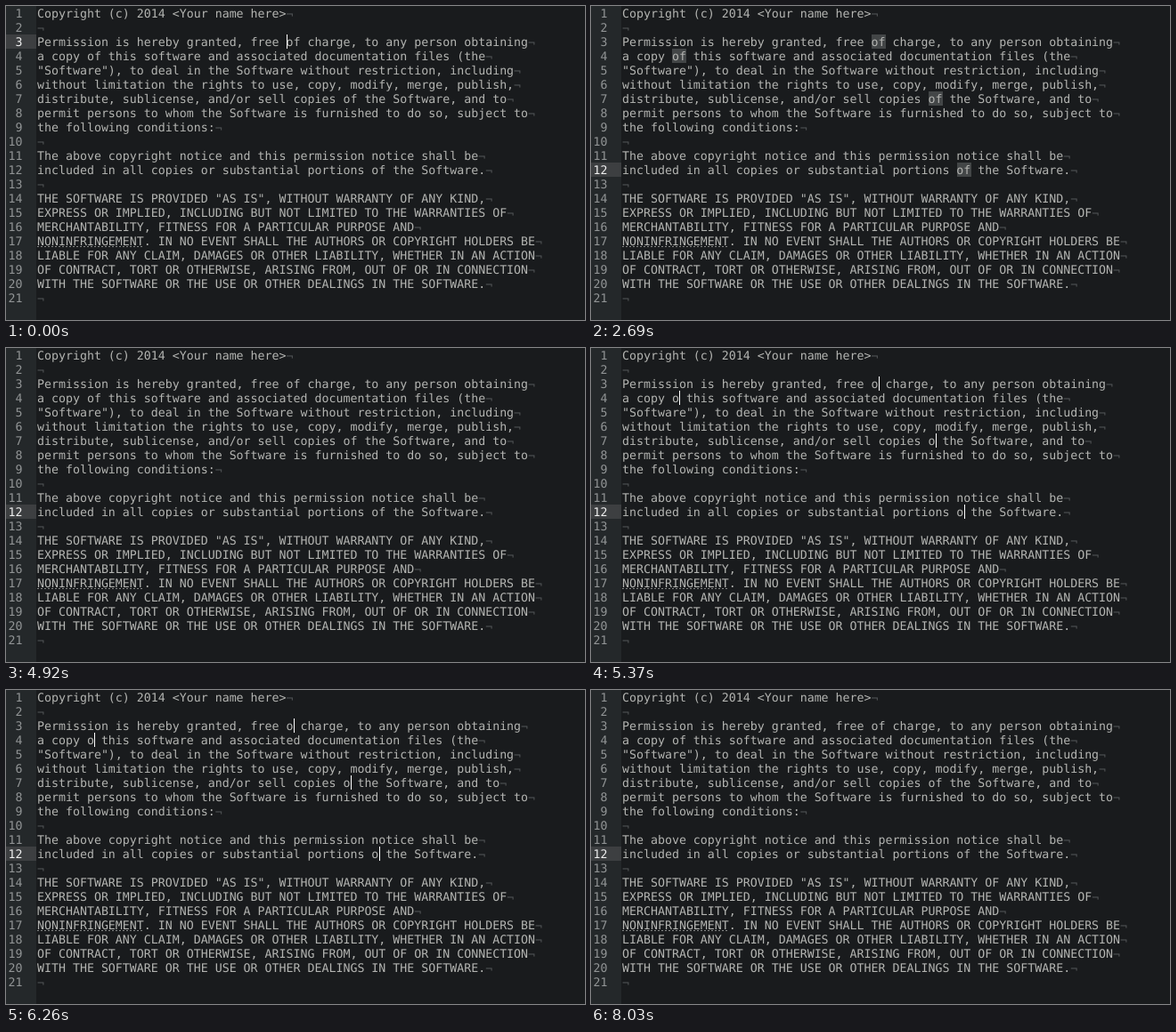
An HTML page that plays this animation: 650 px wide and 353 px high, repeating every 8440 ms.

```html
<!DOCTYPE html>
<html lang="en">
<head>
<meta charset="utf-8">
<title>Multiple cursors</title>
<style>
  html, body { margin: 0; width: 100%; height: 100%; overflow: hidden; background: #191b1d; }
  svg { display: block; width: 650px; height: 353px; }
  text {
    font: 13.288px "DejaVu Sans Mono", "Liberation Mono", monospace;
    text-rendering: geometricPrecision;
    white-space: pre;
    fill: #b4b5b2;
  }
  .number { fill: #929596; text-anchor: end; }
  .number.active { fill: #f0f0f0; }
  .eol { fill: #505355; }
</style>
</head>
<body>
<svg id="stage" viewBox="0 0 650 353"></svg>
<script>
const LOOP = 8440, CELL = 8, ROW = 16, GUTTER = 34, LEFT = 35, BASE = 13;

// "@" marks the word being edited.
const lines = `Copyright (c) 2014 <Your name here>

Permission is hereby granted, free @ charge, to any person obtaining
a copy @ this software and associated documentation files (the
"Software"), to deal in the Software without restriction, including
without limitation the rights to use, copy, modify, merge, publish,
distribute, sublicense, and/or sell copies @ the Software, and to
permit persons to whom the Software is furnished to do so, subject to
the following conditions:

The above copyright notice and this permission notice shall be
included in all copies or substantial portions @ the Software.

THE SOFTWARE IS PROVIDED "AS IS", WITHOUT WARRANTY OF ANY KIND,
EXPRESS OR IMPLIED, INCLUDING BUT NOT LIMITED TO THE WARRANTIES OF
MERCHANTABILITY, FITNESS FOR A PARTICULAR PURPOSE AND
NONINFRINGEMENT. IN NO EVENT SHALL THE AUTHORS OR COPYRIGHT HOLDERS BE
LIABLE FOR ANY CLAIM, DAMAGES OR OTHER LIABILITY, WHETHER IN AN ACTION
OF CONTRACT, TORT OR OTHERWISE, ARISING FROM, OUT OF OR IN CONNECTION
WITH THE SOFTWARE OR THE USE OR OTHER DEALINGS IN THE SOFTWARE.
`.split("\n");

// Each step overrides part of the editor state:
// sel = selected words, carets = [first, end) words with a caret, col = caret offset in the word.
const steps = [
  [0,    { word: "of", sel: 0, carets: [0, 1], col: 0, active: 0 }],
  [150,  { carets: [0, 0] }],
  [440,  { sel: 1 }],
  [1190, { sel: 2, active: 1 }],
  [1940, { sel: 3, active: 2 }],
  [2690, { sel: 4, active: 3 }],
  [3890, { sel: 0, carets: [0, 4] }],
  [4180, { carets: [0, 0] }],
  [4630, { carets: [0, 4], col: 2 }],
  [4920, { carets: [0, 0] }],
  [5370, { carets: [0, 4], word: "o", col: 1 }],
  [5520, { word: "", col: 0 }],
  [5670, { carets: [0, 0] }],
  [6110, { carets: [0, 4] }],
  [6260, { word: "o", col: 1 }],
  [6410, { word: "of", col: 2 }],
  [6550, { carets: [0, 0] }],
  [6850, { carets: [0, 4] }],
  [6990, { carets: [3, 4] }],
  [7290, { carets: [0, 0] }],
  [7740, { carets: [3, 4] }],
  [8030, { carets: [0, 0] }]
];

const stage = document.getElementById("stage");

function add(tag, attrs, parent = stage) {
  const node = document.createElementNS("http://www.w3.org/2000/svg", tag);
  for (const key in attrs) node.setAttribute(key, attrs[key]);
  return parent.appendChild(node);
}

const rect = (x, y, width, height, fill) => add("rect", { x, y, width, height, fill });
const show = (node, on) => node.setAttribute("visibility", on ? "visible" : "hidden");

rect(0, 0, 650, 353, "#191b1d");
rect(0, 0, GUTTER, 353, "#24282a");
const gutterMark = rect(0, 0, GUTTER, ROW, "#3d3f41");

const words = lines.flatMap((line, row) => {
  const col = line.indexOf("@");
  return col < 0 ? [] : [{ row, line, x: LEFT + col * CELL }];
});
for (const word of words) {
  word.selection = rect(word.x, word.row * ROW, 2 * CELL, ROW, "#434647");
}

const numbers = [];
const rows = lines.map((line, row) => {
  const y = row * ROW + BASE;
  numbers.push(add("text", { x: 18.5, y, class: "number" }));
  numbers[row].textContent = row + 1;
  const text = add("text", { x: LEFT, y });
  const body = add("tspan", {}, text);
  body.textContent = line;
  add("tspan", { class: "eol", dy: 1 }, text).textContent = "¬";
  return body;
});

add("path", {
  d: `M${LEFT} 270.5h${15 * CELL}`,
  stroke: "#858786", "stroke-dasharray": "2 2"
});

for (const word of words) word.caret = rect(word.x, word.row * ROW, 1, ROW, "#fff");

function render(time) {
  const state = Object.assign({}, ...steps.filter(([at]) => at <= time).map(step => step[1]));
  const activeRow = words[state.active].row;
  gutterMark.setAttribute("y", activeRow * ROW);
  numbers.forEach((node, row) => node.classList.toggle("active", row === activeRow));
  words.forEach((word, i) => {
    rows[word.row].textContent = word.line.replace("@", state.word);
    show(word.selection, i < state.sel);
    show(word.caret, i >= state.carets[0] && i < state.carets[1]);
    word.caret.setAttribute("x", word.x + state.col * CELL);
  });
}

const start = performance.now();
function tick() {
  render((performance.now() - start) % LOOP);
  requestAnimationFrame(tick);
}
render(0);
requestAnimationFrame(tick);
</script>
</body>
</html>
```
